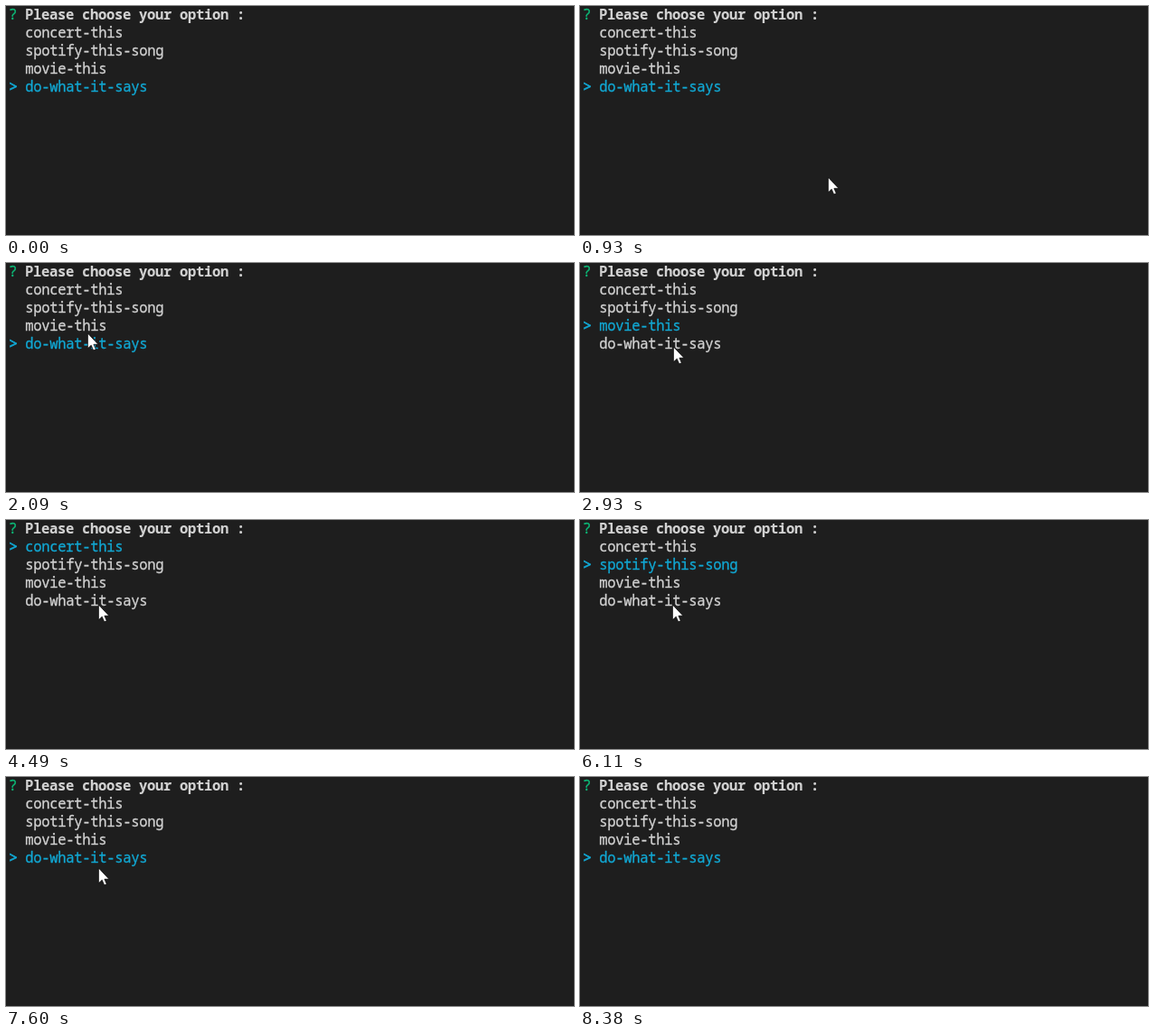
Write an HTML page that moves like this. It is 628 px wide and 254 px high and loops after 9690 ms.

```html
<!DOCTYPE html>
<html lang="en">
<head>
<meta charset="utf-8">
<title>Option prompt</title>
<style>
  html, body { margin: 0; width: 100%; height: 100%; overflow: hidden; background: #1e1e1e; }
  svg { display: block; width: 628px; height: 254px; }
  text {
    font: 15.5px "Noto Sans Mono", "DejaVu Sans Mono", monospace;
    letter-spacing: -0.3px;
    font-variant-ligatures: none;
    color: #d2d2d2;
    fill: currentColor;
    stroke: currentColor;
    stroke-width: .3px;
  }
  .title { font-weight: 700; stroke-width: .1px; }
  .mark { color: #0dbc79; }
  .on { color: #11a8d4; }
  #caret { font-size: 17px; stroke-width: .7px; }
</style>
</head>
<body>
<svg viewBox="0 0 628 254">
  <text class="mark" x="3" y="15">?</text>
  <text class="title" x="21" y="15">Please choose your option :</text>
  <g id="list"></g>
  <text id="caret" class="on" x="3">&gt;</text>
  <path id="mouse" d="M.4 0V16.8L4.2 13.2L6.7 18.9L9.3 17.8L6.9 12.3H11.9Z"
        fill="#fff" stroke="#000" stroke-width=".7"/>
</svg>
<script>
const LOOP = 9690;
const STEP = 77; // ms between pointer updates
const options = ["concert-this", "spotify-this-song", "movie-this", "do-what-it-says"];

// Key presses that move the selection
const ups = [2700, 3480, 4490];
const downs = [6110, 6740, 7430];

// The pointer glides from its last place to x, y in n steps; pow > 1 starts slowly
const pointer = { x: 472, y: 257, show: 530, hide: 8380 };
const glides = [
  { at: 530, x: 300, y: 200, n: 3 },
  { at: 850, x: 248, y: 180, n: 4 },
  { at: 1470, x: 104, y: 112, n: 5, pow: 4 },
  { at: 1930, x: 90, y: 78, n: 3 },
  { at: 2160, x: 105, y: 93 },
  { at: 2930, x: 103, y: 93 },
  { at: 3790, x: 102, y: 94 },
  { at: 7290, x: 102, y: 96 },
  { at: 7600, x: 102, y: 101 },
  { at: 7670, x: 420, y: 247, n: 9, pow: 1.4 }
];

const list = document.getElementById("list");
const caret = document.getElementById("caret");
const mouse = document.getElementById("mouse");
const rowY = i => 35 + 20 * i;

const rows = options.map((label, i) => {
  const row = document.createElementNS("http://www.w3.org/2000/svg", "text");
  row.setAttribute("x", 21.3);
  row.setAttribute("y", rowY(i));
  row.textContent = label;
  return list.appendChild(row);
});

const count = (times, t) => times.filter(time => time <= t).length;

function pointerAt(t) {
  let { x, y } = pointer;
  for (const { at, x: toX, y: toY, n = 1, pow = 1 } of glides) {
    if (t < at) break;
    const done = Math.min(n, Math.floor((t - at) / STEP) + 1);
    const u = (done / n) ** pow;
    x += (toX - x) * u;
    y += (toY - y) * u;
  }
  return [Math.round(x), Math.round(y)];
}

function draw(t) {
  const pick = options.length - 1 - count(ups, t) + count(downs, t);
  rows.forEach((row, i) => row.classList.toggle("on", i === pick));
  caret.setAttribute("y", rowY(pick));

  const shown = t >= pointer.show && t < pointer.hide;
  mouse.setAttribute("visibility", shown ? "visible" : "hidden");
  mouse.setAttribute("transform", `translate(${pointerAt(t)})`);
}

const start = performance.now();
function tick() {
  draw((performance.now() - start) % LOOP);
  requestAnimationFrame(tick);
}
draw(0);
requestAnimationFrame(tick);
</script>
</body>
</html>
```
